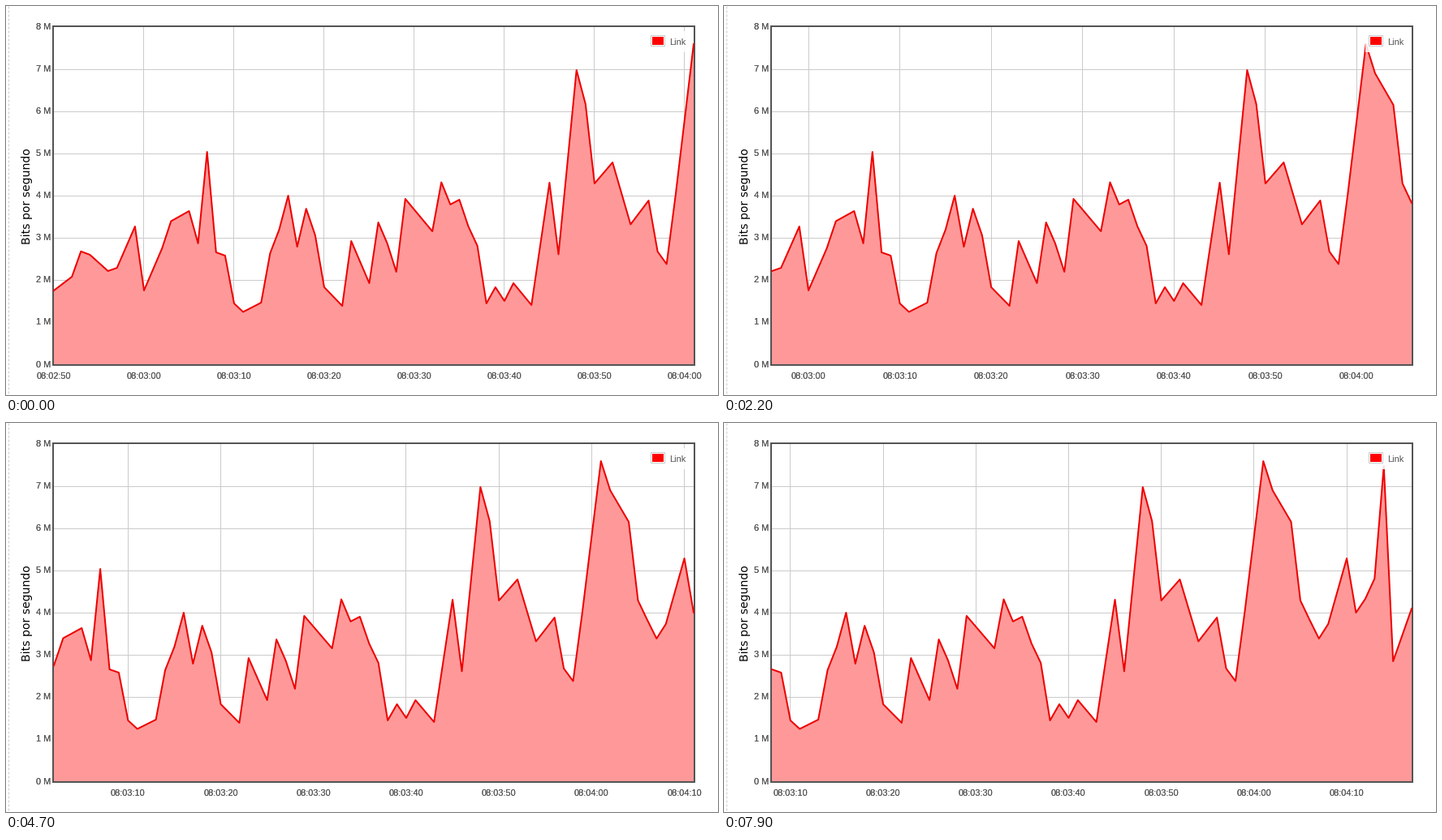
Write a matplotlib script that moves like this. It is 877 px wide and 480 px high and loops after 8 s.

```python
import matplotlib.pyplot as plt
from matplotlib.animation import FuncAnimation
from matplotlib.patches import Polygon, Rectangle

W, H, DPI = 877, 480, 64
LEFT, RIGHT, TOP, BOTTOM = 59, 847, 26, 443
MAX_RATE = 8
GREY, GRID = "#545454", "#cbcbcb"
FRAMES, INTERVAL = 80, 100

# Samples arrive about once a second; some seconds are skipped.
CLOCK_START = 8 * 3600 + 2 * 60 + 50
SKIPPED = {1, 5, 8, 11, 14, 22, 31, 34, 40, 41, 52, 54, 57, 61, 63, 65, 70, 73, 79, 86}
TIMES = [t for t in range(88) if t not in SKIPPED]
RATES = [
    1.765, 2.09, 2.69, 2.61, 2.225, 2.30, 3.28, 1.765, 2.76, 3.405,
    3.645, 2.88, 5.045, 2.667, 2.59, 1.458, 1.257, 1.477, 2.647, 3.204,
    4.01, 2.80, 3.70, 3.07, 1.842, 1.40, 2.935, 1.938, 3.376, 2.878,
    2.206, 3.933, 3.165, 4.326, 3.80, 3.914, 3.28, 2.82, 1.458, 1.842,
    1.516, 1.938, 1.42, 4.317, 2.62, 6.983, 6.178, 4.297, 4.796, 3.329,
    3.894, 2.686, 2.389, 4.03, 7.597, 6.906, 6.158, 4.297, 3.837, 3.396,
    3.74, 5.295, 4.01, 4.336, 4.815, 7.48, 2.858, 4.105,
]
WINDOW = 55
ARRIVALS = [400, 900, 1600, 2000, 2700, 3500, 4100, 4700, 5100, 5600, 6100, 6900, 7300]

fig = plt.figure(figsize=(W / DPI, H / DPI), dpi=DPI, facecolor="white")
ax = fig.add_axes([0, 0, 1, 1])
ax.set(xlim=(0, W), ylim=(H, 0))
ax.axis("off")


def pt(px):
    return px * 72 / DPI


def y_of(rate):
    return BOTTOM - rate * (BOTTOM - TOP) / MAX_RATE


def box(x, y, w, h, color, z, alpha=1):
    return ax.add_patch(Rectangle((x, y), w, h, fc=color, lw=0, alpha=alpha, zorder=z))


def label(x, y, text, ha, layers=2):
    """Small grey text; two layers give the tick labels their heavier look."""
    return [ax.text(x, y, text, ha=ha, va="baseline", color=GREY, zorder=6,
                    family="Liberation Sans", fontsize=pt(11))
            for _ in range(layers)]


def clock(t):
    s = CLOCK_START + t
    return f"{s // 3600:02d}:{s // 60 % 60:02d}:{s % 60:02d}"


# Fixed parts
ax.plot([2.5, 2.5], [0, H], color="#cccccc", lw=pt(1), dashes=(3, 2))
for rate in range(MAX_RATE + 1):
    if 0 < rate < MAX_RATE:
        box(LEFT, int(y_of(rate)), RIGHT - LEFT, 1, GRID, 1)
    label(55, int(y_of(rate)) + 3, f"{rate} M", "right")
ax.text(30, 234.5, "Bits por segundo", rotation=90, rotation_mode="anchor",
        ha="center", va="baseline", family="DejaVu Sans", fontsize=pt(14), color="black")

for x, y, w, h in [(LEFT - 2, TOP - 2, RIGHT - LEFT + 4, 2), (LEFT - 2, BOTTOM - 1, RIGHT - LEFT + 4, 2),
                   (LEFT - 2, TOP - 2, 2, BOTTOM - TOP + 3), (RIGHT, TOP - 2, 2, BOTTOM - TOP + 3)]:
    box(x, y, w, h, GREY, 3)

box(790, 31, 52, 26, "white", 5, alpha=0.85)
box(794, 36, 18, 14, GRID, 6)
box(795, 37, 16, 12, "white", 7)
box(796, 38, 14, 10, "#ff0000", 8)
label(817, 48, "Link", "left", layers=1)

# Moving parts
area = ax.add_patch(Polygon([(0, 0)] * 3, fc="#ff9999", lw=0, zorder=2))
line, = ax.plot([], [], color="#ee0000", lw=pt(2), solid_joinstyle="round", zorder=4)
line.set_clip_path(Rectangle((LEFT - 1, TOP), RIGHT - LEFT + 2, BOTTOM - TOP, transform=ax.transData))
ticks = [(box(0, TOP, 1, BOTTOM - TOP, GRID, 1), label(0, 460, "", "center")) for _ in range(9)]


def update(frame):
    first = sum(frame * INTERVAL >= at for at in ARRIVALS)
    times = TIMES[first:first + WINDOW]
    start, end = times[0], times[-1]

    def x_of(t):
        return LEFT + (t - start) * (RIGHT - LEFT) / (end - start)

    xs = [x_of(t) for t in times]
    ys = [y_of(r) for r in RATES[first:first + WINDOW]]
    line.set_data(xs, ys)
    area.set_xy([(LEFT, BOTTOM), *zip(xs, ys), (RIGHT, BOTTOM)])

    for i, (rule, texts) in enumerate(ticks):
        t = 10 * i
        shown = start <= t <= end
        rule.set_visible(shown and start < t < end)
        rule.set_x(int(x_of(t)))
        for text in texts:
            text.set_visible(shown)
            text.set_text(clock(t))
            text.set_x(round(x_of(t)))
    return [area, line]


anim = FuncAnimation(fig, update, frames=FRAMES, interval=INTERVAL, repeat=True, repeat_delay=0)
plt.show()
```
